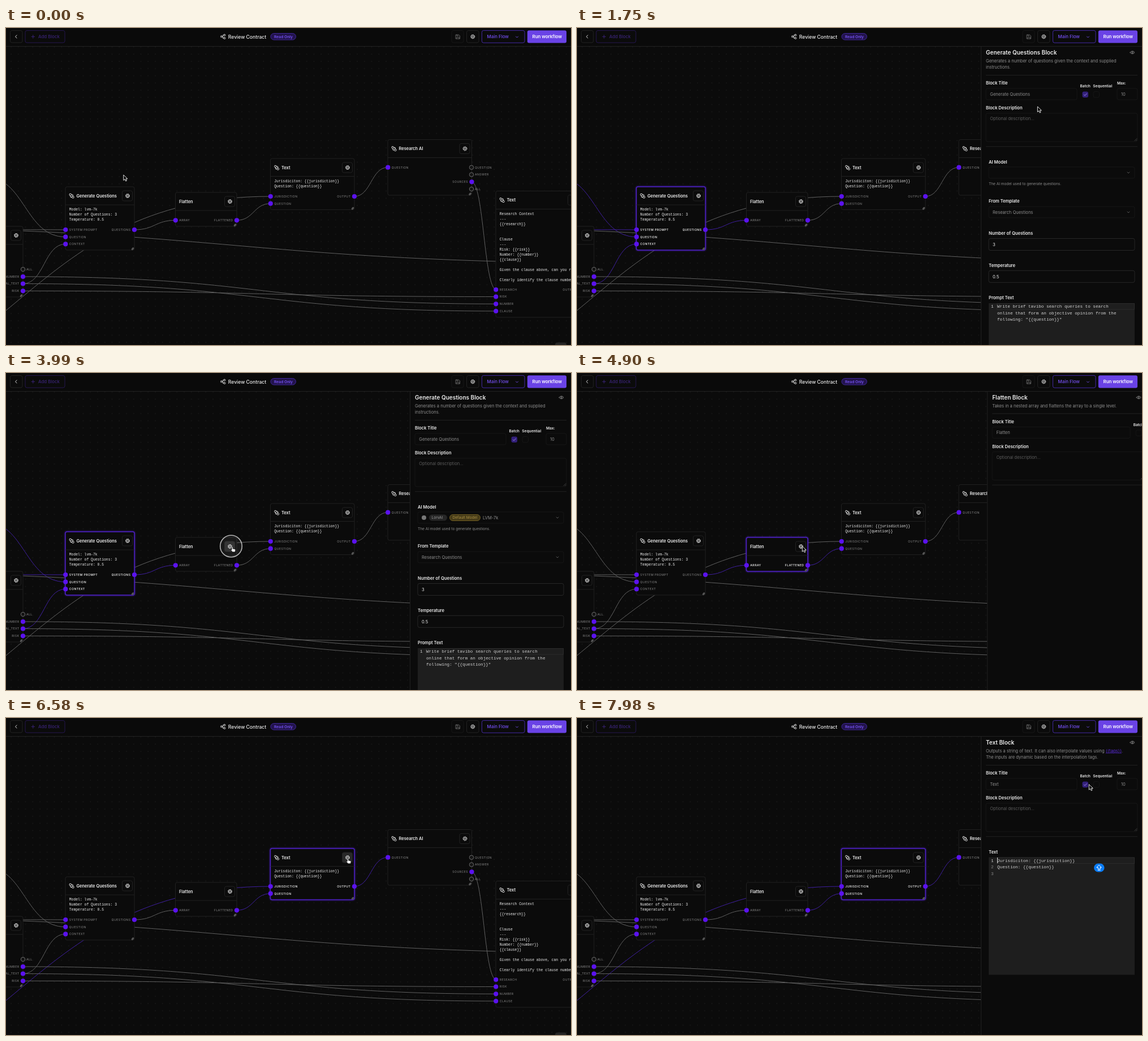
Animation, 999 px wide and 561 px high, one loop 8000 ms. Source, as an HTML page:

```html
<!DOCTYPE html>
<html lang="en">
<head>
<meta charset="utf-8">
<title>Workflow editor</title>
<style>
html, body { margin: 0; height: 100%; overflow: hidden; background: #0b0b0b; }
svg { display: block; width: 100vw; height: 100vh; }
text { font: 400 7.55px Inter, sans-serif; fill: #ededed; white-space: pre; }
.b { font-weight: 600; font-size: 7.6px; }
.small { font-size: 6.6px; }
.dim { fill: #8d8d8d; }
.faint { fill: #5c5c5c; }
.mono { font: 6.38px "Liberation Mono", monospace; }
.code { font: 7.63px "Liberation Mono", monospace; fill: #d0d0d0; }
.port { font-size: 5.2px; letter-spacing: .4px; fill: #8a8a8a; }
.end { text-anchor: end; }
.edge { fill: none; stroke: #606060; }
.edge.on { stroke: #3f1fa0; }
.box { fill: #0b0b0b; stroke: #202020; }
.on > .box { stroke: #4c20c0; stroke-width: 1.5; filter: drop-shadow(0 0 1.8px #4c20c0); }
.on > .port { fill: #fff; font-weight: 500; }
.btn { fill: #0b0b0b; stroke: #222; }
.btn.hot { fill: #282828; }
.field { fill: none; stroke: #161616; }
.strong { stroke: #272727; }
.line { fill: none; stroke: #212121; }
.ico { fill: none; stroke: #ddd; stroke-linecap: round; stroke-linejoin: round; }
</style>
</head>
<body>
<script>
const text = (x, y, s, cls = '', more = '') => `<text x="${x}" y="${y}" class="${cls}" ${more}>${s}</text>`;
const rect = (x, y, w, h, cls, r = 3, more = '') =>
  `<rect x="${x}" y="${y}" width="${w}" height="${h}" rx="${r}" class="${cls}" ${more}/>`;
const path = (d, cls = 'ico', more = '') => `<path d="${d}" class="${cls}" ${more}/>`;
const lines = (x, y, step, list, cls) => list.map((s, i) => text(x, y + i * step, s, cls)).join('');
const gear = (x, y, c = '#ddd') => `<g fill="none" stroke="${c}" transform="translate(${x} ${y})">
  <circle r="2.7"/><circle r="1" stroke-width=".8"/><circle r="3.6" stroke-dasharray="1.4 1.43"/></g>`;
const chevron = (x, y, c = '#555') => path(`M${x - 2} ${y - 1}l2 2 2-2`, 'ico', `style="stroke:${c}"`);

// Nodes: ports are [label, y, hollow]
const nodes = {
  left: { x: -90, y: 351, r: 30, b: 476, div: 383, title: '',
    outs: [['ALL', 427, 1], ['NUMBER', 440], ['ORIGINAL_TEXT', 452.5], ['RISK', 465.3]] },
  gen: { x: 105, y: 281, r: 227, b: 393, div: 313, title: 'Generate Questions', icon: 1,
    body: ['Model: lvm-7k', 'Number of Questions: 3', 'Temperature: 0.5'], bodyY: 323,
    ins: [['SYSTEM PROMPT', 357], ['QUESTION', 369.7], ['CONTEXT', 382.4]], outs: [['QUESTIONS', 357]] },
  flat: { x: 299.5, y: 291, r: 408, b: 351, div: 323, title: 'Flatten',
    ins: [['ARRAY', 340.3]], outs: [['FLATTENED', 340.3]] },
  text: { x: 467.5, y: 231, r: 616, b: 321.5, div: 262.5, title: 'Text', icon: 1,
    body: ['Jurisdiciton: {{jurisdiction}}', 'Question: {{question}}'], bodyY: 273,
    ins: [['JURISDICTION', 298], ['QUESTION', 310.7]], outs: [['OUTPUT', 298]] },
  research: { x: 675, y: 197.5, r: 823.5, b: 296, div: 229.5, title: 'Research AI', icon: 1,
    ins: [['QUESTION', 246.7]], outs: [['SOURCES', 272.3]],
    side: [['QUESTION', 246.7], ['ANSWER', 259.5], ['ALL', 285]] },
  last: { x: 866, y: 288.5, r: 1015, b: 512, div: 320.5, title: 'Text', icon: 1, bodyY: 330.5,
    body: ['Research Context', '---', '{{research}}', '', '', 'Clause', '---', 'Risk: {{risk}}',
      'Number: {{number}}', '{{clause}}', '', 'Given the clause above, can you review', '',
      'Clearly identify the clause number'],
    ins: [['RESEARCH', 463], ['RISK', 475.5], ['NUMBER', 488.3], ['CLAUSE', 501]], outs: [['OUTPUT', 463]] },
};

// Edges: x0, y0, x1, y1, then the nodes that highlight it
const edges = [
  [-200, 356, 105, 357, 'gen'], [-38, 263, 105, 369.7, 'gen'], [30, 452.5, 105, 382.4, 'gen'],
  [-350, 352, 1150, 416.6], [227, 357, 300, 340.3, 'gen', 'flat'], [408, 340.3, 468, 310.7, 'flat', 'text'],
  [-432, 672, 468, 298, 'text'], [30, 440, 867, 488.3], [30, 452.5, 867, 501], [30, 465.3, 867, 475.5],
  [616, 298, 675, 246.7, 'text'], [823, 272.3, 867, 463],
];
const edge = ([x0, y0, x1, y1, ...keys]) => {
  const mid = (x0 + x1) / 2;
  return path(`M${x0} ${y0}C${mid} ${y0} ${mid} ${y1} ${x1} ${y1}`, 'edge', `data-keys="${keys.join(' ')}"`);
};
const dot = (x, y, hollow) =>
  `<circle cx="${x}" cy="${y}" r="${hollow ? 3.7 : 4.1}" fill="${hollow ? '#141414' : '#5b12ee'}" stroke="${hollow ? '#6c6c6c' : 'none'}"/>`;

function node([key, n]) {
  const { x, y, r, b, div, ins = [], outs = [], side = [] } = n;
  let s = rect(x, y, r - x, b - y, 'box') + path(`M${x} ${div}H${r}`, 'line');
  if (n.icon) s += `<g class="ico" transform="translate(${x + 11} ${y + 16})">
    <rect x="-3.8" y="-3.6" width="3.4" height="3.2" rx=".8"/><rect x=".6" y=".8" width="3.4" height="3.2" rx=".8"/>
    <path d="M-2 0v2.4H.6M-.4-2H2.2V.8"/></g>`;
  s += text(x + (n.icon ? 19.5 : 6.5), y + 18.7, n.title, 'b', 'style="font-size:7.45px"');
  s += rect(r - 21.5, y + 7, 18, 18, 'btn') + gear(r - 12, y + 16);
  if (n.body) s += lines(x + 6.8, n.bodyY, 9, n.body, 'mono');
  for (const [label, py] of ins) s += dot(x + .3, py) + text(x + 6.8, py + 1.9, label, 'port');
  for (const [label, py, hollow] of outs)
    s += dot(r, py, hollow) + (hollow ? text(r + 6, py + 1.9, label, 'port') : text(r - 6.6, py + 1.9, label, 'port end'));
  for (const [label, py] of side) s += dot(r - .5, py, 1) + text(r + 5.5, py + 1.9, label, 'port');
  s += `<ellipse cx="${r - 3}" cy="${b - 2.3}" rx="2.8" ry="1.7" fill="#555" transform="rotate(-45 ${r - 3} ${b - 2.3})"/>`;
  return `<g id="${key}">${s}</g>`;
}

const header = rect(0, 0, 999, 32, '', 0, 'fill="#0a0a0a"') + path('M0 32.5H999', 'line') +
  rect(7.5, 4.5, 21.5, 21.5, 'btn') + path('M19 12.7l-2.4 2.6 2.4 2.6') +
  rect(34, 4.5, 70, 21.5, 'btn', 3, 'style="stroke:#24164f"') +
  path('M45 15.3h5.6M47.8 12.5v5.6', 'ico', 'style="stroke:#3a2478"') +
  text(57, 18, 'Add Block', '', 'style="fill:#3a2478;font-size:7.8px;font-weight:500"') +
  `<g class="ico" style="stroke-width:.9"><rect x="379.5" y="14" width="2.6" height="2.6" rx="1"/>
   <rect x="385" y="11.3" width="2.8" height="2.6" rx=".7"/><rect x="385" y="16.7" width="2.8" height="2.6" rx=".7"/>
   <path d="M382 15.3h1.3v-2.6H385M383.3 15.3V18H385"/></g>` +
  text(392.8, 18.6, 'Review Contract', '', 'style="font-size:8.6px;font-weight:500"') +
  rect(468, 9.5, 44.5, 11.5, '', 5.8, 'fill="#22134c" stroke="#4a2cb4" stroke-width=".8"') +
  text(474, 17.7, 'Read Only', 'b', 'style="font-size:6.7px;fill:#7452f0"') +
  rect(788, 4.5, 21, 21.5, 'btn', 3, 'style="stroke:#171717"') +
  path('M795.5 12h5l2 2v5h-7zM797 19v-2.8h4V19M797 12v1.8h2.6', 'ico', 'style="stroke:#777;stroke-width:.8"') +
  rect(814.5, 4.5, 21.5, 21.5, 'btn') + gear(825.3, 15.3) +
  rect(841.4, 4.4, 75.6, 21.8, 'btn', 3, 'style="stroke:#5433cc;stroke-width:.8"') +
  text(850.5, 18, 'Main Flow', '', 'style="fill:#7650f5;font-size:7.9px;font-weight:500"') + chevron(903.5, 16, '#6a48dd') +
  rect(921.8, 4.2, 69.2, 22.3, '', 3, 'fill="#6a43e6"') +
  text(930.5, 18, 'Run workflow', 'b', 'style="font-size:7.9px;fill:#fff"');

// Panels are laid out from their own left edge
const batching = rect(9, 107, 161, 20, 'field') + text(175.5, 105.4, 'Batch', 'b small') +
  rect(179.5, 112.5, 10.5, 10.5, '', 3, 'fill="#33207a"') + path('M182.4 118l1.7 1.7 3.2-3.6', 'ico', 'style="stroke:#9a86e8"') +
  text(198.3, 105.4, 'Sequential', 'b small') + rect(199, 112.5, 10.5, 10.5, 'field') +
  text(241, 99.8, 'Max:', 'b small') + rect(241, 107, 36, 20, 'field') + text(248, 120.2, '10', 'dim');
const noBatching = rect(9, 107, 244, 20, 'field') + text(258.5, 105.4, 'Batch', 'b small') + rect(263, 112.5, 10.5, 10.5, 'field');

function panel(id, title, desc, name, options, extra = '') {
  const dy = (desc.length - 2) * 11.6;
  return `<g id="${id}">` + rect(0, 33, 300, 540, '', 0, 'fill="#0b0b0b"') + path('M.5 33V561', 'line') +
    text(9, 46.8, title, 'b', 'style="font-size:10px"') +
    path('M264 43.3q4-5 8 0q-4 5-8 0z', 'ico', 'style="stroke:#999;stroke-width:.8"') +
    '<circle cx="268" cy="43.3" r="1.2" fill="none" stroke="#999" stroke-width=".8"/>' +
    lines(9, 60.6, 11.2, desc, 'dim') + `<g transform="translate(0 ${dy})">` + path('M9 83.5H277', 'line') +
    text(9, 100.3, 'Block Title', 'b') + options + text(16.3, 119.7, name, 'dim') +
    text(9, 144.2, 'Block Description', 'b') + rect(9, 151, 268, 50, 'field') +
    text(16.3, 163.2, 'Optional description…', 'faint') + path('M272 199.5l4-4M274.5 199.5l1.5-1.5', 'ico', 'style="stroke:#666;stroke-width:.6"') +
    path('M9 209.8H277', 'line') + '</g>' + extra + '</g>';
}
const editor = (y, h, list, nums) => rect(14, y, 258, h, '', 0, 'fill="#1e1e1e"') +
  rect(28.5, y + .5, 243, 10.5, '', 0, 'fill="none" stroke="#2b2b2b"') +
  Array.from({ length: nums }, (_, i) => text(18, y + 8.3 + i * 11.5, i + 1, 'code', i ? 'style="fill:#888"' : '')).join('') +
  lines(29, y + 8.3, 11.5, list, 'code');
const field = (y, label, value) => text(14, y, label, 'b') + rect(14, y + 6.5, 258, 21, 'field strong') + text(21, y + 19.8, value);

const model = '<g id="model"><circle cx="25" cy="256" r="4" fill="#777"/>' +
  rect(34, 250.5, 32, 11, '', 5.5, 'fill="#262626"') + text(38.5, 258.3, 'LorvAI', 'small', 'style="fill:#9a9a9a"') +
  rect(70.5, 250.5, 54, 11, '', 5.5, 'fill="#463b18" stroke="#7d6725" stroke-width=".8"') +
  text(75.5, 258.3, 'Default Model', 'small', 'style="fill:#a98f45"') + text(129, 258.8, 'LVM-7k', 'dim') + '</g>';
const genExtra = text(14, 239.5, 'AI Model', 'b') + rect(14, 246, 258, 20, 'field') + chevron(261, 256) + model +
  text(14, 277.8, 'The AI model used to generate questions.', 'dim', 'style="font-size:6.5px"') +
  text(14, 309.2, 'From Template', 'b') + rect(14, 316, 258, 20, 'field') + text(21, 328.7, 'Research Questions', 'dim') + chevron(261, 326) +
  field(366, 'Number of Questions', '3') + field(422.8, 'Temperature', '0.5') +
  '<g id="prompt">' + text(14, 479.8, 'Prompt Text', 'b') +
  editor(487, 80, ['Write brief tavibo search queries to search', 'online that form an objective opinion from the', 'following: "{{question}}"'], 1) + '</g>';
const textExtra = '<g id="source">' + text(14, 239.5, 'Text', 'b') +
  editor(246.5, 208, ['Jurisdiciton: {{jurisdiction}}', 'Question: {{question}}'], 3) +
  path('M29.5 247V257', '', 'stroke="#ddd"') + '<g id="caps">' +
  rect(200, 257.5, 18.5, 15, '', 7.5, 'fill="#0a7cf5"') +
  path('M209.2 260.5l4 4h-2v3h-4v-3h-2zM207.2 269.5h4', 'ico', 'style="stroke:#fff"') + '</g></g>';

const cursors = `<g id="cursor" stroke-linejoin="round">
  <path id="arrow" d="M.3 0V9.6L2.6 7.5 4.2 11 5.9 10.2 4.4 6.9H7.3Z" fill="#000" stroke="#fff" stroke-width=".9"/>
  <path id="hand" d="M1.2 1.2q1-1 1.9 0V4.4l3.6.8q1.2.4 1 1.8L7 10.2H2.6L-.5 6.6q.2-1.2 1.7-.3Z" fill="#fff" stroke="#000" stroke-width=".6"/></g>`;

document.body.innerHTML = `<svg viewBox="0 0 999 561" preserveAspectRatio="none">
  <pattern id="dots" x="3" y="2" width="12.75" height="12.75" patternUnits="userSpaceOnUse"><circle cx="6" cy="6" r=".6" fill="#303030"/></pattern>
  <rect width="999" height="561" fill="#0b0b0b"/><rect width="999" height="561" fill="url(#dots)"/>
  ${edges.map(edge).join('')}${Object.entries(nodes).map(node).join('')}
  ${rect(971, 556.5, 20, 14, '', 4, 'fill="#242424"')}
  ${panel('genPanel', 'Generate Questions Block', ['Generates a number of questions given the context and supplied', 'instructions.'], 'Generate Questions', batching, genExtra)}
  ${panel('flatPanel', 'Flatten Block', ['Takes in a nested array and flattens the array to a single level.'], 'Flatten', noBatching)}
  ${panel('textPanel', 'Text Block', ['Outputs a string of text. It can also interpolate values using <tspan fill="#5a2bd8" text-decoration="underline">{{tags}}</tspan>.',
    'The inputs are dynamic based on the interpolation tags.'], 'Text', batching, textExtra)}
  ${header}
  <circle id="ring" r="19.3" fill="#fff" fill-opacity=".06" stroke="#b5b5b5" stroke-width="1.6"/>
  ${cursors}</svg>`;

// Timeline, in ms
const LOOP = 8000;
const spans = [['gen', 330, 587, 4060], ['flat', 4060, 4524, 6440], ['text', 6440, 6780, 8000]]; // select, open, end
const presses = [[290, 400], [500, 590], [3970, 4340], [4470, 4560], [6390, 6500], [6700, 6790]];
const hands = [[230, 620], [3800, 4620], [6270, 6880]];
const track = [[0, 207.5, 260], [60, 207.5, 260], [280, 217.5, 295], [840, 217.5, 294], [1250, 217.5, 294], [1340, 217, 293.5],
  [1560, 797, 145], [1750, 814, 139], [1830, 896, 131], [2040, 631, 210], [2240, 551, 250], [2600, 840, 73], [2940, 905, 113],
  [3070, 905, 113], [3290, 462, 248], [3480, 462, 248], [3850, 398, 306.5], [5010, 398, 306.5], [5320, 800, 160], [5500, 845, 142],
  [6060, 546, 252], [6300, 602, 247.5], [7180, 603, 247.5], [7700, 905, 119], [7830, 905, 117], [7960, 905, 117.5]];

const $ = id => document.getElementById(id);
const show = (id, on) => { $(id).style.display = on ? '' : 'none'; };
const within = (t, list) => list.some(([a, b]) => t >= a && t < b);

// cubic-bezier(.4, 0, .2, 1)
function ease(u) {
  if (u <= 0) return 0;
  if (u >= 1) return 1;
  let lo = 0, hi = 1;
  for (let i = 0; i < 20; i++) {
    const s = (lo + hi) / 2, x = 1.2 * s * (1 - s) ** 2 + .6 * s * s * (1 - s) + s ** 3;
    if (x < u) lo = s; else hi = s;
  }
  return lo * lo * (3 - 2 * lo);
}
function pointer(t) {
  const i = track.findIndex(k => k[0] > t);
  if (i < 0) return track[track.length - 1].slice(1);
  const [t0, x0, y0] = track[i - 1], [t1, x1, y1] = track[i];
  const u = (t - t0) / (t1 - t0), s = u * u * (3 - 2 * u);
  return [x0 + (x1 - x0) * s, y0 + (y1 - y0) * s];
}

function draw(t) {
  const now = spans.find(([, a, , b]) => t >= a && t < b);
  const key = now ? now[0] : '', hand = within(t, hands), [x, y] = pointer(t);
  for (const [id, , open] of spans) {
    const on = key === id;
    $(id).classList.toggle('on', on);
    show(id + 'Panel', on && t >= open);
    $(id + 'Panel').setAttribute('transform', `translate(${714 + 285 * (1 - ease((t - open) / 500))} 0)`);
    const { r, y: top } = nodes[id];
    $(id).querySelector('.btn').classList.toggle('hot', hand && Math.hypot(x - r + 12, y - top - 16) < 12);
  }
  for (const e of document.querySelectorAll('.edge'))
    e.classList.toggle('on', !!key && e.dataset.keys.split(' ').includes(key));
  show('model', t >= 2300);
  show('prompt', t >= 980);
  show('source', t >= 7080);
  show('caps', t >= 7350);
  show('ring', within(t, presses));
  $('ring').setAttribute('transform', `translate(${x} ${y})`);
  $('cursor').setAttribute('transform', `translate(${x} ${y})`);
  show('hand', hand);
  show('arrow', !hand);
}

const start = performance.now();
function tick() {
  draw((performance.now() - start) % LOOP);
  requestAnimationFrame(tick);
}
tick();
</script>
</body>
</html>
```
